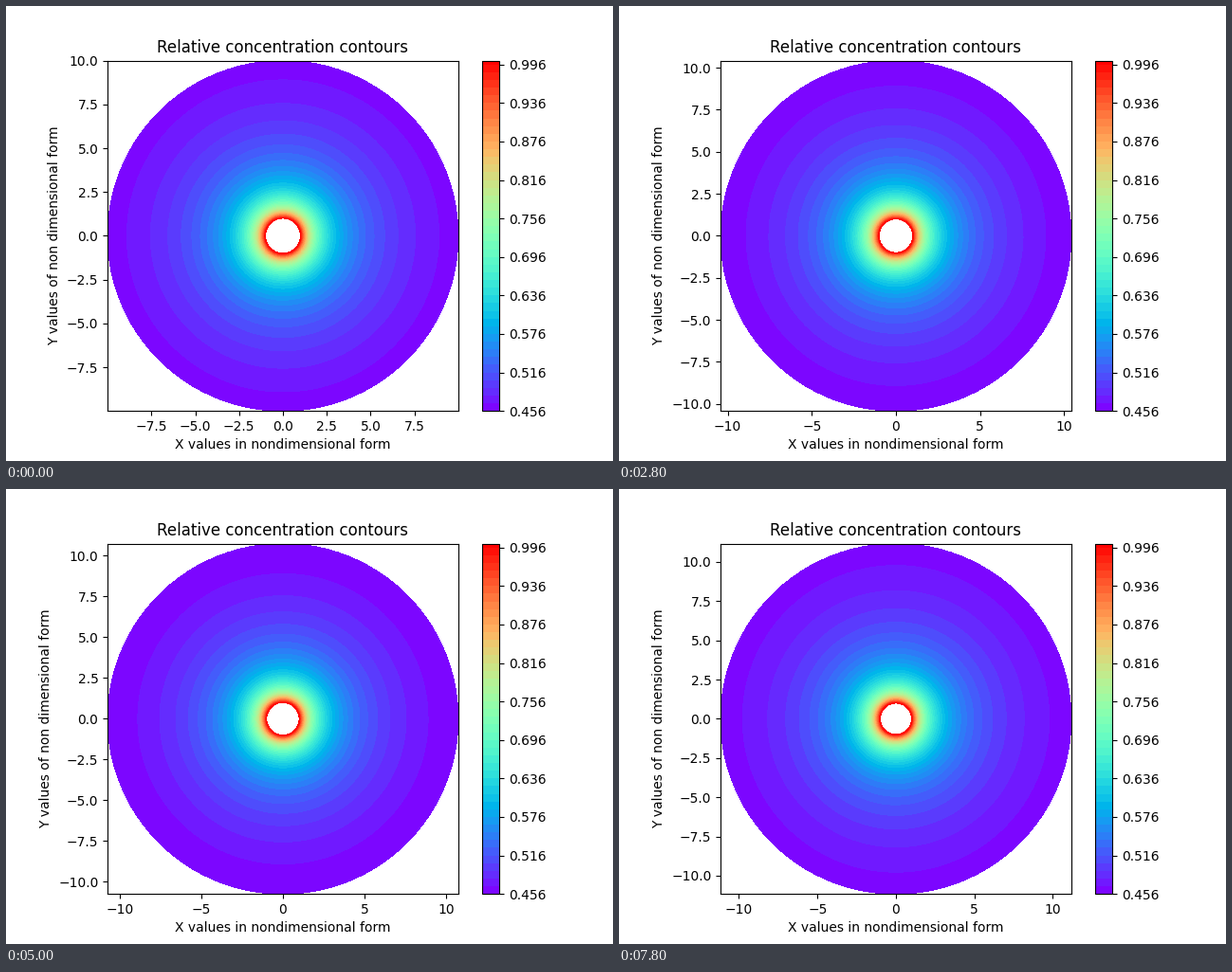
A matplotlib script for the animation above (8000 ms loop, 640 px wide and 480 px high).

```python
import numpy as np
import matplotlib.pyplot as plt
from matplotlib.animation import FuncAnimation

FRAMES, INTERVAL = 40, 200
DR = 0.03          # radial grid step; the domain gains one ring per frame
START_RINGS = 300
DROP = 0.5993      # concentration lost between the core and infinity
STEP = 0.012
TOP = 1.002

theta = np.linspace(0, 2 * np.pi, 100)

fig, ax = plt.subplots(figsize=(6.4, 4.8), dpi=100)


def concentration(r):
    return 1 - DROP * (1 - 1 / r)


def band_levels(lowest):
    base = np.floor(lowest / (STEP / 2)) * STEP / 2
    return np.append(np.arange(base, 0.9999, STEP), TOP)


def draw(n):
    r = 1 + DR * np.arange(START_RINGS + n + 1)
    rr, tt = np.meshgrid(r, theta)
    levels = band_levels(concentration(r[-1]))
    ax.clear()
    bands = ax.contourf(rr * np.sin(tt), rr * np.cos(tt), concentration(rr),
                        levels=levels, cmap="rainbow",
                        vmin=levels[0], vmax=TOP)
    ax.set_aspect("equal", adjustable="box")
    ax.set_title("Relative concentration contours")
    ax.set_xlabel("X values in nondimensional form")
    ax.set_ylabel("Y values of non dimensional form")
    return bands


first = draw(0)
fig.colorbar(first, ax=ax, spacing="proportional",
             ticks=first.levels[:-1:5], format="%.3f")

anim = FuncAnimation(fig, draw, frames=FRAMES, interval=INTERVAL,
                     init_func=lambda: None, repeat=True, repeat_delay=0,
                     blit=False)
plt.show()
```
